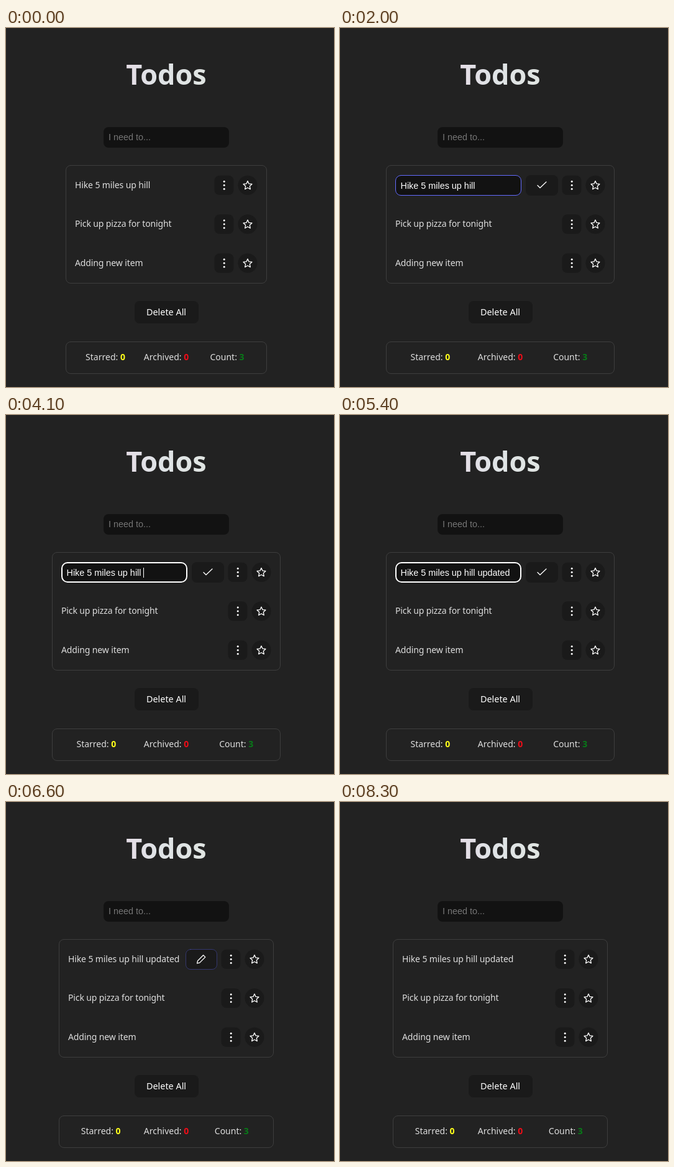
Recreate the animation shown at these times as an HTML page with a canvas. Size 528 by 576 pixels, loop 9.9 s.

```html
<!DOCTYPE html>
<html lang="en">
<head>
<meta charset="utf-8">
<title>Todos</title>
<style>
  html, body { margin: 0; width: 100%; height: 100%; overflow: hidden; background: #222; }
  canvas { display: block; }
</style>
</head>
<body>
<canvas id="stage" width="528" height="576"></canvas>
<script>
const ctx = document.getElementById('stage').getContext('2d');
const LOOP = 9900, STEP = 100, CENTER = 258;
const SANS = '"Noto Sans", "Open Sans", sans-serif';
const BODY = `14px ${SANS}`;
const INPUT = '14.4px "Liberation Sans", Arial, sans-serif';
const BUTTON = '#1a1a1a', FIELD = '#121212', ACCENT = '#646cff', INK = '#dedede';
const TASK = 'Hike 5 miles up hill', ADDED = ' updated';

// [time, characters of ADDED present]
const KEYS = [[4100, 1], [4200, 2], [4300, 3], [4400, 4], [4500, 5], [4600, 7], [4800, 8]];

const within = (t, from, to) => t >= from && t < to;

// Ease-out over 250 ms, as in a button's border transition
function fade(t, start) {
  const x = Math.min(1, Math.max(0, (t - start) / 250));
  return 1 - (1 - x) ** 2;
}

function text(str, x, y, { font = BODY, color = INK, align = 'left', spacing = 0 } = {}) {
  ctx.font = font;
  ctx.fillStyle = color;
  ctx.textAlign = align;
  ctx.letterSpacing = spacing + 'px';
  ctx.fillText(str, x, y);
}

function widthOf(str, font) {
  ctx.font = font;
  ctx.letterSpacing = '0px';
  return ctx.measureText(str).width;
}

function box(x, y, w, h, fill, r = 8) {
  ctx.beginPath();
  ctx.roundRect(x, y, w, h, r);
  ctx.fillStyle = fill;
  ctx.fill();
}

function outline(x, y, w, h, color, { line = 1, alpha = 1, r = 8 } = {}) {
  ctx.save();
  ctx.globalAlpha = alpha;
  ctx.strokeStyle = color;
  ctx.lineWidth = line;
  ctx.beginPath();
  ctx.roundRect(x + line / 2, y + line / 2, w - line, h - line, r - line / 2);
  ctx.stroke();
  ctx.restore();
}

function polyline(points, closed) {
  ctx.beginPath();
  points.forEach(([x, y]) => ctx.lineTo(x, y));
  if (closed) ctx.closePath();
  ctx.strokeStyle = '#fff';
  ctx.lineWidth = 1.3;
  ctx.lineJoin = ctx.lineCap = 'round';
  ctx.stroke();
}

function dot(x, y, r, fill) {
  ctx.beginPath();
  ctx.arc(x, y, r, 0, 2 * Math.PI);
  ctx.fillStyle = fill;
  ctx.fill();
}

function star(x, y) {
  const points = Array.from({ length: 10 }, (_, i) => {
    const a = i * Math.PI / 5 - Math.PI / 2, r = i % 2 ? 3.5 : 7.3;
    return [x + r * Math.cos(a), y + r * Math.sin(a)];
  });
  polyline(points, true);
}

function rowButtons(right, y) {
  const menuX = right - 69, starX = right - 31;
  box(menuX - 15.5, y - 15.5, 31, 31, BUTTON);
  for (const dy of [-6, 0, 6]) dot(menuX + .2, y + dy, 1.5, '#fff');
  dot(starX, y, 15.5, BUTTON);
  star(starX, y + .4);
}

function iconButton(x, w, alpha) {
  box(x, 236, w, 33, BUTTON);
  outline(x, 236, w, 33, ACCENT, { alpha });
}

function pencil(x, alpha) {
  iconButton(x, 51, alpha);
  const shape = [[-6.6, 6.6], [-5.6, 2.4], [3.4, -6.6], [6.6, -3.4], [-2.4, 5.6]];
  polyline(shape.map(([dx, dy]) => [x + 25.2 + dx, 252.3 + dy]), true);
}

function check(x, alpha) {
  iconButton(x, 52, alpha);
  polyline([[x + 19, 252.5], [x + 23, 256.5], [x + 33, 247]]);
}

function editor(t) {
  const typed = KEYS.reduce((n, [at, count]) => t >= at ? count : n, 0);
  const value = TASK + ADDED.slice(0, typed);
  const focused = t >= 2400;
  box(89, 236, 203, 33, FIELD, 9);
  if (focused) outline(89, 236, 203, 33, '#fff', { line: 2, r: 10 });
  else outline(89, 236, 203, 33, ACCENT, { alpha: fade(t, 1750), r: 9 });
  text(value, 97.5, 258, { font: INPUT, color: '#fff' });
  const caretOff = within(t, 3000, 3700) || within(t, 5400, 5900);
  if (focused && !caretOff) {
    ctx.fillStyle = '#fff';
    ctx.fillRect(Math.floor(97.5 + widthOf(value, INPUT)), 245, 1, 16);
  }
  check(299, fade(t, 5850));
}

function stat(label, value, color, x) {
  const bold = `bold 14px ${SANS}`;
  const labelWidth = widthOf(label, BODY);
  const left = x - (labelWidth + widthOf(value, bold)) / 2;
  text(label, left, 533);
  text(value, left + labelWidth, 533, { font: bold, color });
}

function header() {
  const tint = ctx.createLinearGradient(193, 0, 322, 0);
  tint.addColorStop(0, '#e5dde6');
  tint.addColorStop(.4, '#dfe3e6');
  tint.addColorStop(1, '#e0e5e2');
  text('Todos', CENTER, 91, { font: `600 45px ${SANS}`, color: tint, align: 'center' });
  box(157, 159, 202, 33, FIELD);
  text('I need to...', 165, 180, { font: INPUT, color: '#757575' });
}

function draw(t) {
  const editing = within(t, 1700, 6400), saved = t >= 6400;
  const width = editing ? 368 : saved ? 346 : 324;
  const left = CENTER - width / 2, right = left + width;

  ctx.fillStyle = '#222';
  ctx.fillRect(0, 0, 528, 576);
  header();

  outline(left, 220, width, 190, '#3e3e3e');
  const items = [TASK + (saved ? ADDED : ''), 'Pick up pizza for tonight', 'Adding new item'];
  items.forEach((item, i) => {
    const y = 252.3 + i * 62.5;
    if (i || !editing) text(item, left + 15, Math.floor(y) + 5, { spacing: -.12 });
    rowButtons(right, y);
  });
  if (editing) editor(t);
  else if (within(t, 1400, 1700)) pencil(242, fade(t, 1350));
  else if (within(t, 6400, 8300)) pencil(289, fade(t, 6550) - fade(t, 7850));

  box(207, 438, 103, 36, BUTTON);
  text('Delete All', CENTER, 461, { font: `500 14.4px ${SANS}`, color: '#fff', align: 'center' });

  outline(left, 503, width, 52, '#3e3e3e');
  const gap = width / 3 - 10;
  stat('Starred: ', '0', '#ffff1a', CENTER - gap);
  stat('Archived: ', '0', '#f00d18', CENTER);
  stat('Count: ', '3', '#087a18', CENTER + gap);
}

const start = performance.now();
function tick() {
  const t = (performance.now() - start) % LOOP;
  draw(Math.floor(t / STEP) * STEP);
  requestAnimationFrame(tick);
}
tick();
</script>
</body>
</html>
```
